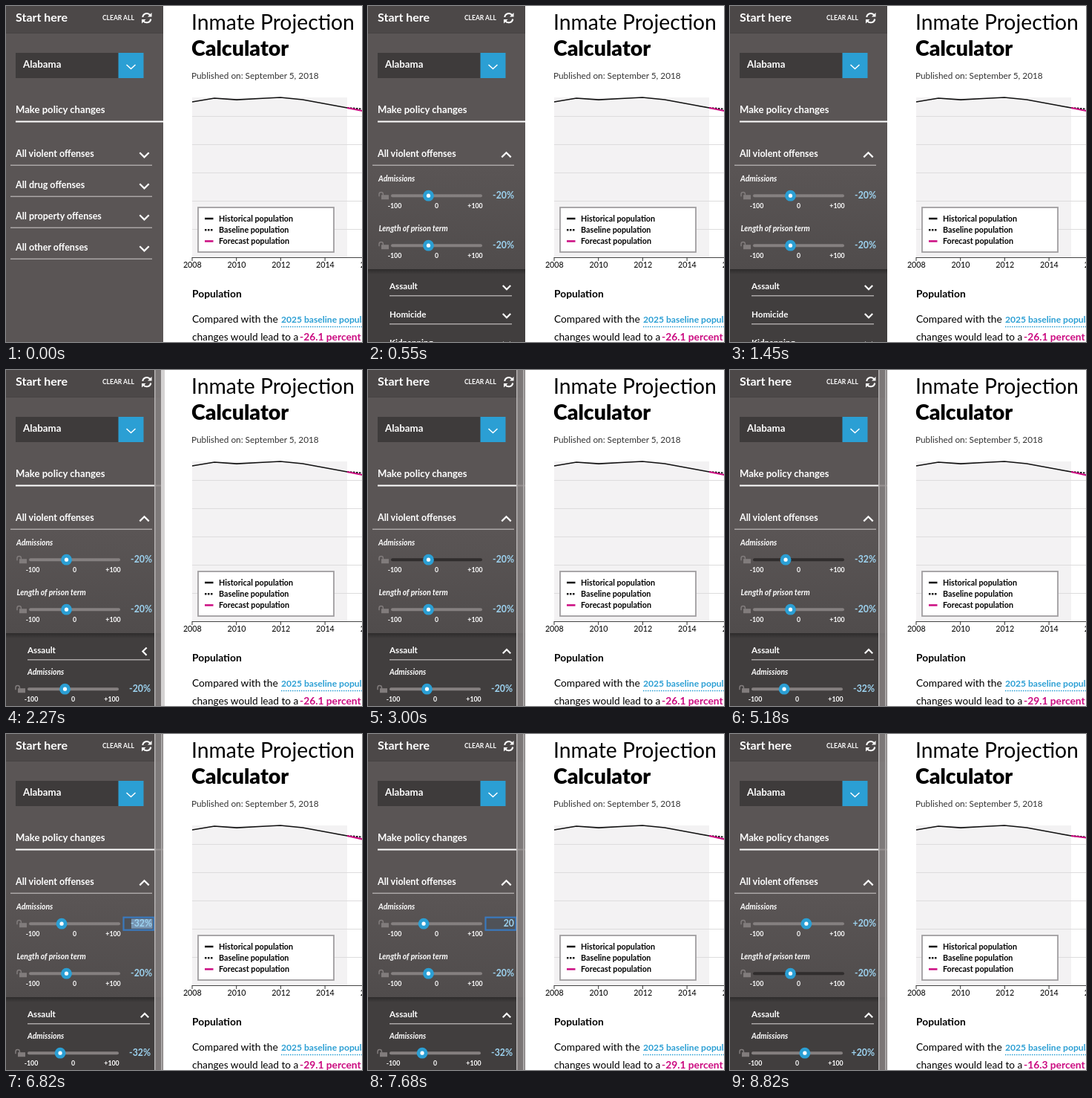
These frames come from a looping animation (480x452 px, 8870 ms). An HTML page:

```html
<!DOCTYPE html>
<html lang="en">
<head>
<meta charset="utf-8">
<title>Inmate Projection Calculator</title>
<style>
  html, body { margin: 0; width: 100%; height: 100%; overflow: hidden; background: #fff; }
  svg { display: block; font-family: Lato, sans-serif; }
  .bold { font-weight: 700; }
  .side { fill: #fff; font-weight: 700; }
  .chevron { fill: none; stroke: #fff; stroke-width: 2.2; }
  .rule { stroke: #aaa6a6; stroke-width: 1.5; }
</style>
</head>
<body>
<svg id="stage" width="480" height="452" viewBox="0 0 480 452"></svg>
<script>
const LOOP = 8870;
const BLUE = '#2b9fd4', PINK = '#cb0a80', PANEL = '#5a5555', DARK = '#413e3e';

const text = (x, y, size, str, attrs = '') =>
  `<text x="${x}" y="${y}" font-size="${size}" ${attrs}>${str}</text>`;
const side = (x, y, size, str, attrs = '') => text(x, y, size, str, `class="side" ${attrs}`);
const rect = (x, y, w, h, fill, attrs = '') =>
  `<rect x="${x}" y="${y}" width="${w}" height="${h}" fill="${fill}" ${attrs}/>`;
const line = (x1, y1, x2, y2, attrs) =>
  `<path d="M${x1} ${y1}L${x2} ${y2}" fill="none" ${attrs}/>`;
const chevron = (x, y, r, id = '') =>
  `<g transform="translate(${x} ${y})"><path ${id && `id="${id}"`} class="chevron" d="M${-r} ${-r / 2}L0 ${r / 2}L${r} ${-r / 2}"/></g>`;

const row = (y, label, id) =>
  side(13, y + 0.3, 12.5, label) + chevron(186.5, y - 2.7, 6.2, id) +
  line(6, y + 11.3, 197, y + 11.3, 'class="rule"');

const subRow = (y, label, id) =>
  side(29, y - 0.3, 11.6, label) + chevron(187, y - 2.4, 5.2, id) +
  line(29, y + 8.8, 194, y + 8.8, 'class="rule"');

// y is the centre of the slider track
const slider = (id, y, label, labelX) =>
  side(labelX, y - 19, 10.4, label, 'font-style="italic"') +
  `<path d="M15 ${y + 1}v-3a2.7 2.7 0 0 1 5.4 0v2" fill="none" stroke="#817c7c" stroke-width="1.5"/>` +
  rect(18, y - 1, 10, 6, '#817c7c') +
  line(33, y, 152, y, `id="${id}Track" stroke-width="4" stroke-linecap="round"`) +
  `<g id="${id}Knob"><circle cy="${y}" r="7.4" fill="${BLUE}"/><circle cy="${y}" r="2.6" fill="#fff"/></g>` +
  `<g id="${id}Focus">${rect(158.5, y - 8.5, 41, 17, '#4f5258', 'stroke="#3a79bd" stroke-width="2.2"')}</g>` +
  rect(169, y - 6.5, 28.5, 13, '#7896b4', `id="${id}Select"`) +
  text(197, y + 4, 12.3, '', `id="${id}Value" class="bold" fill="#9dd3f0" text-anchor="end"`) +
  [[36, '-100'], [92.5, '0'], [144.5, '+100']].map(([x, s]) =>
    side(x, y + 17, 8.8, s, 'text-anchor="middle"')).join('');

const sidebar = `
  ${rect(0, 0, 212, 452, PANEL)}
  ${rect(0, 0, 212, 36, '#4c4848')}
  ${rect(0, 36, 212, 1, '#474343')}
  ${side(13, 20.5, 16, 'Start here')}
  ${side(130, 18.5, 8.5, 'CLEAR ALL')}
  <path d="M184.3 15a5.6 5.6 0 0 1 10-2.8M195.3 17.5a5.6 5.6 0 0 1-10 2.6" fill="none" stroke="#fff" stroke-width="2"/>
  <path d="M196.5 9v5.5h-5.5zM183 23.5V18h5.500z" fill="#fff"/>
  ${rect(13, 63, 139, 34, '#3e3b3b')}
  ${rect(151.5, 63, 34, 34, BLUE)}
  ${side(23, 83, 13.3, 'Alabama')}
  <path d="M162.5 79l6 5.5l6-5.5" fill="none" stroke="#fff" stroke-width="1.5"/>
  ${side(13, 143.5, 13.1, 'Make policy changes')}
  ${line(13, 155.5, 212, 155.5, 'stroke="#fff" stroke-width="2"')}
  ${row(203, 'All violent offenses', 'violentArrow')}
  <g id="otherRows">
    ${row(245, 'All drug offenses')}
    ${row(287, 'All property offenses')}
    ${row(329, 'All other offenses')}
  </g>
  <g clip-path="url(#violentClip)">
    ${rect(0, 216, 212, 138, 'url(#panelFade)')}
    ${slider('main', 255.2, 'Admissions', 14)}
    ${slider('term', 322.2, 'Length of prison term', 14.5)}
    ${rect(0, 354, 212, 98, DARK)}
    ${rect(0, 354, 212, 7, 'url(#shade)')}
    ${subRow(381, 'Assault', 'assaultArrow')}
    <g id="subRows">
      ${subRow(419, 'Homicide')}
      ${subRow(457, 'Kidnapping')}
    </g>
    <g clip-path="url(#assaultClip)">
      <g transform="translate(-2 174)">${slider('assault', 255.2, 'Admissions', 31)}</g>
    </g>
  </g>
  <g id="scrollbar">
    ${rect(200, 0, 12, 452, '#858181', 'opacity=".85"')}
    ${rect(200, 0, 1.5, 452, '#b5b2b2')}
    ${rect(209, 0, 2, 452, '#aaa7a7')}
    ${rect(209, 0, 5, 452, '#d4d2d2', 'id="scrollEdge"')}
  </g>`;

const years = [2008, 2010, 2012, 2014, 2016].map((year, i) => {
  const x = 251 + i * 59.7;
  return line(x, 338, x, 343, 'stroke="#333"') + text(x + 0.3, 352.2, 10.7, year, 'text-anchor="middle"');
}).join('');

const legend = [
  ['Historical population', '#111', ''],
  ['Baseline population', '#111', 'stroke-dasharray="2.5 1.5"'],
  ['Forecast population', PINK, '']
].map(([label, color, dash], i) => {
  const y = 286 + i * 15.2;
  return line(268, y, 279.5, y, `stroke="${color}" stroke-width="2.5" ${dash}`) +
    text(287, y + 4, 10.75, label, 'class="bold"');
}).join('');

const article = `
  ${text(250, 31.5, 28.3, 'Inmate Projection')}
  ${text(250, 67, 28.5, 'Calculator', 'font-weight="900"')}
  ${text(250, 97.7, 11.8, 'Published on: September 5, 2018', 'fill="#333"')}
  ${rect(251, 123, 209, 215, '#f3f2f3')}
  ${[148.5, 186.5, 224.5, 262.5, 300.5].map(y => line(251, y, 480, y, 'stroke="#dddcdd"')).join('')}
  ${line(251, 338.5, 480, 338.5, 'stroke="#444"')}
  ${years}
  ${line(460, 137, 482, 138.7, 'stroke="#111" stroke-width="2" stroke-dasharray="2.5 1.5"')}
  <path id="forecast" fill="none" stroke="${PINK}" stroke-width="2"/>
  <path d="M251 129L281 124L311 126.2L341 124.5L370 123L400 126L430 131.5L460 137" fill="none" stroke="#111" stroke-width="1.7"/>
  ${rect(259, 271, 183, 60, '#fff', 'stroke="#a09ea0" stroke-width="1.8"')}
  ${legend}
  ${text(251, 391.5, 13.8, 'Population', 'class="bold"')}
  ${text(251, 426, 13.75, 'Compared with the')}
  ${text(371, 426, 12.1, '2025 baseline population, these', `class="bold" fill="${BLUE}"`)}
  ${line(371, 431.5, 480, 431.5, `stroke="${BLUE}" stroke-width="1.5" stroke-dasharray="1.5 1.5"`)}
  ${text(251, 450, 13.65, 'changes would lead to a')}
  ${text(396, 450, 13.8, '', `id="percent" class="bold" fill="${PINK}"`)}`;

document.getElementById('stage').innerHTML = `
  <defs>
    <clipPath id="violentClip"><rect id="violentWindow" y="216" width="212"/></clipPath>
    <clipPath id="assaultClip"><rect id="assaultWindow" y="392" width="212"/></clipPath>
    <linearGradient id="shade" x2="0" y2="1">
      <stop stop-color="#000" stop-opacity=".3"/><stop offset="1" stop-color="#000" stop-opacity="0"/>
    </linearGradient>
    <linearGradient id="panelFade" x2="0" y2="1">
      <stop stop-color="${PANEL}"/><stop offset="1" stop-color="#504c4c"/>
    </linearGradient>
  </defs>
  ${article}${sidebar}`;

const el = id => document.getElementById(id);
const set = (id, name, value) => el(id).setAttribute(name, value);
const show = (id, on) => set(id, 'visibility', on ? 'visible' : 'hidden');
const progress = (t, start, end) => Math.min(1, Math.max(0, (t - start) / (end - start)));
const between = (t, start, end) => t >= start && t < end;
const signed = v => `${v > 0 ? '+' : ''}${v}%`;

// Linear interpolation through [position, value] pairs
function through(pos, keys) {
  let value = keys[0][1];
  for (let i = 1; i < keys.length; i++) {
    const [p0, v0] = keys[i - 1], [p1, v1] = keys[i];
    value += (v1 - v0) * progress(pos, p0, p1);
  }
  return value;
}

const DRAG = [[3450, -20], [3850, -16], [4200, -16], [5050, -32]];
const EFFECT = [[-32, -29.1], [-20, -26.1], [-16, -25.1], [20, -16.3]];
const SELECT = 6410, TYPE_FIRST = 7250, TYPE_SECOND = 7450, APPLY = 7700;

function setSlider(id, value, label, active) {
  set(id + 'Knob', 'transform', `translate(${92.2 + value * 0.535} 0)`);
  set(id + 'Track', 'stroke', active ? '#302d2d' : '#858080');
  el(id + 'Value').textContent = label;
}

function draw(t) {
  const violent = progress(t, 130, 400);
  set('violentWindow', 'height', violent * 400);
  set('otherRows', 'transform', `translate(0 ${violent * 400})`);
  set('violentArrow', 'transform', `rotate(${violent * 180})`);

  const assault = progress(t, 2150, 2390);
  set('assaultWindow', 'height', assault * 140);
  set('subRows', 'transform', `translate(0 ${assault * 140})`);
  set('assaultArrow', 'transform', `rotate(${assault * 180})`);

  show('scrollbar', t >= 1860);
  set('scrollEdge', 'opacity', t < 2640 ? 1 : 0);

  const value = t >= APPLY ? 20 : Math.round(through(t, DRAG));
  const typed = between(t, TYPE_FIRST, TYPE_SECOND) ? '2' : between(t, TYPE_SECOND, APPLY) ? '20' : signed(value);
  setSlider('main', value, typed, between(t, 2860, 5500));
  setSlider('assault', value, signed(value), false);
  setSlider('term', -20, signed(-20), t >= 8140);

  for (const id of ['main', 'term', 'assault']) {
    show(id + 'Focus', id === 'main' && between(t, SELECT, APPLY));
    show(id + 'Select', id === 'main' && between(t, SELECT, TYPE_FIRST));
  }

  const effect = through(value, EFFECT);
  el('percent').textContent = `${effect.toFixed(1)} percent`;
  set('forecast', 'd', `M460 137L482 ${137 - effect * 0.165}`);
}

function frame() {
  draw(performance.now() % LOOP);
  requestAnimationFrame(frame);
}
frame();
</script>
</body>
</html>
```
